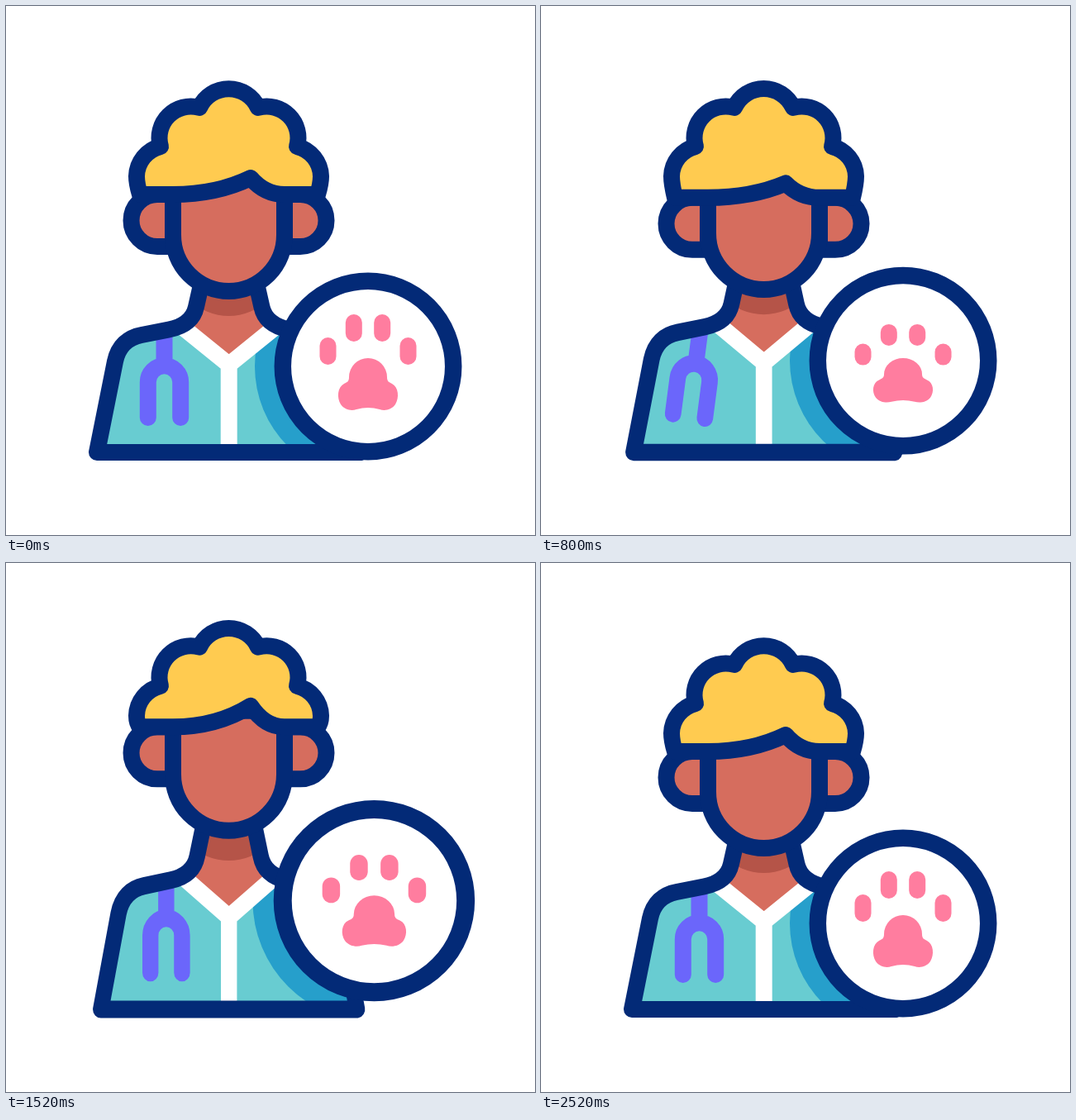
An HTML page with a canvas that plays this animation: 640x640 px, repeating every 2.88 s.

```html
<!DOCTYPE html>
<html lang="en">
<head>
<meta charset="utf-8">
<title>Vet</title>
<style>
html, body { margin: 0; width: 100%; height: 100%; overflow: hidden; background: #fff; }
canvas { display: block; width: 100vw; height: 100vh; }
</style>
</head>
<body>
<canvas width="640" height="640"></canvas>
<script>
const LOOP = 2880, STEP = 20;
const NAVY = '#032a77', HAIR = '#ffcb50', SKIN = '#d66d5e', SHADE = '#b55448',
      TEAL = '#68ccd1', BLUE = '#269fcb', VIOLET = '#6b66fb', PINK = '#ff7d9f';
const ctx = document.querySelector('canvas').getContext('2d');
ctx.lineJoin = ctx.lineCap = 'round';

// Returns a smooth curve through [ms, value] points that never overshoots them.
function curve(...points) {
  const last = points.length - 1;
  const rise = i => (points[i + 1][1] - points[i][1]) / (points[i + 1][0] - points[i][0]);
  const slope = i => {
    if (i < 1 || i >= last) return 0;
    const a = rise(i - 1), b = rise(i);
    return a * b > 0 ? 2 * a * b / (a + b) : 0;
  };
  return t => {
    if (t <= points[0][0]) return points[0][1];
    if (t >= points[last][0]) return points[last][1];
    const i = points.findIndex(p => p[0] > t) - 1;
    const [t0, v0] = points[i], [t1, v1] = points[i + 1];
    const h = t1 - t0, u = (t - t0) / h, w = 1 - u;
    return w * w * (1 + 2 * u) * v0 + u * u * (3 - 2 * u) * v1
      + h * u * w * (w * slope(i) - u * slope(i + 1));
  };
}

// The hop drives the whole figure: 1 is a full crouch, negative is a stretch.
const hop = curve([200, 0], [450, 1], [600, .376], [1020, -.52], [1330, -.71], [1465, -.6],
  [1705, .92], [1860, -.12], [1990, -.36], [2400, 0]);
const nod = curve([200, 0], [600, 8], [1020, 3], [1520, -14], [1860, 8], [2140, -13], [2440, 0]);
const swing = curve([200, 0], [600, 7], [1020, 8], [1520, 0], [1860, 5.5], [2140, -10.5], [2440, 0]);
const press = curve([200, 0], [500, 1], [1020, 1], [1520, .6], [1860, 1], [2140, 0]);

// Head and badge follow the body a little late; stretches reach further than crouches.
function poseAt(t) {
  const reach = (v, gain) => v < 0 ? v * gain : v;
  const body = hop(t), late = hop(t - 60);
  const size = 1 - .12 * late;
  return {
    wide: 1 + .085 * body,
    tall: 1 - .085 * reach(body, 1.75),
    head: 35 * late,
    nod: nod(t),
    swing: swing(t),
    press: press(t),
    size,
    x: 336 + 102 * size,
    y: 436 + 35 * reach(hop(t - 15), 1.75)
  };
}

function fill(path, color) {
  ctx.fillStyle = color;
  ctx.fill(path);
}
function line(path, color = NAVY, width = 20) {
  ctx.strokeStyle = color;
  ctx.lineWidth = width;
  ctx.stroke(path);
}
function outlined(d, color) {
  const path = new Path2D(d);
  fill(path, color);
  line(path);
}
function disc(x, y, r) {
  const path = new Path2D();
  path.arc(x, y, r, 0, 7);
  return path;
}
function group(draw) {
  ctx.save();
  draw();
  ctx.restore();
}
function scaleAt(x, y, sx, sy) {
  ctx.translate(x, y);
  ctx.scale(sx, sy);
  ctx.translate(-x, -y);
}

const torso = new Path2D('M110 540L132 430C136 411 148 401 164 398L197 391.5C217 387.5 227 378 230 364L244 302'
  + 'H295.4L309.4 364C312.4 378 322.4 387.5 342.4 391.5L375.4 398C391.4 401 403.4 411 407.4 430L429.4 540Z');
const neck = new Path2D('M212 387L269.7 434L327.4 387V300H212Z');
const collar = new Path2D('M212 387.3L269.7 434L327.4 387.3M269.7 434V540');
const tube = new Path2D('M191.5 380V435M171.8 498V455a19.7 19.7 0 0 1 39.4 0V498');
const pad = new Path2D('M-23 13A23 23 0 0 1 23 13C23 18 25 19 29 21C37 25 38 38 33 46C28 53 20 54 14 52'
  + 'Q0 48 -14 52C-20 54 -28 53 -33 46C-38 38 -37 25 -29 21C-25 19 -23 18 -23 13Z');

function drawBody(p) {
  group(() => {
    scaleAt(269.7, 540, p.wide, p.tall);
    group(() => {
      ctx.clip(torso);
      fill(torso, TEAL);
      group(() => {
        ctx.resetTransform();
        fill(disc(p.x, p.y, 137 * p.size), BLUE);
      });
      group(() => {
        ctx.translate(191.5, 396);
        ctx.rotate(p.swing * Math.PI / 180);
        ctx.translate(-191.5, -396);
        line(tube, VIOLET);
      });
      fill(neck, SKIN);
      group(() => {
        ctx.clip(neck);
        ctx.resetTransform();
        const drop = (p.head + 165 * (1 - p.tall)) / 2;
        fill(disc(269.5, 307 + drop, 68), SHADE);
      });
      ctx.lineCap = 'butt';
      ctx.lineJoin = 'miter';
      line(collar, '#fff');
    });
    line(torso);
  });
}

function drawHead(p) {
  const brow = 228 + .6 * p.nod, tip = 208 + p.nod;
  const chin = 277 - .3 * Math.max(0, p.nod);
  group(() => {
    ctx.translate(0, p.head);
    outlined(`M202 ${brow}H183a31.5 31.5 0 0 0 0 63H202Z`, SKIN);
    outlined(`M337 ${brow}H356a31.5 31.5 0 0 1 0 63H337Z`, SKIN);
    outlined(`M202 200V${chin}a67.5 68 0 0 0 135 0V200Z`, SKIN);
    outlined(`M162 ${brow}Q158 215 158 206A38 38 0 0 1 187 170A38 38 0 0 1 234 123A39 39 0 0 1 305 123`
      + `A38 38 0 0 1 352 170A38 38 0 0 1 381 206Q381 215 377 ${brow}H337`
      + `Q313 ${brow} 296 ${tip}Q255 ${brow} 202 ${brow}Z`, HAIR);
  });
}

function drawBadge(p) {
  const toe = (x, y) => {
    const h = 33 - 7 * p.press;
    const path = new Path2D();
    path.roundRect(x - 10, y - h / 2, 20, h, 10);
    fill(path, PINK);
  };
  group(() => {
    ctx.translate(p.x, p.y);
    ctx.scale(p.size, p.size);
    const ring = disc(0, 0, 103.2);
    fill(ring, '#fff');
    line(ring, NAVY, 20.5);
    for (const side of [-1, 1]) {
      toe(side * 17.2, -46.5 + 15.3 * p.press);
      toe(side * 48.5, -18.5 + 11 * p.press);
    }
    scaleAt(0, 36, 1, 1 - .15 * p.press);
    fill(pad, PINK);
  });
}

function draw(t) {
  const p = poseAt(t);
  ctx.fillStyle = '#fff';
  ctx.fillRect(0, 0, 640, 640);
  drawBody(p);
  drawHead(p);
  drawBadge(p);
}

const start = performance.now();
function tick() {
  const t = (performance.now() - start) % LOOP;
  draw(Math.floor(t / STEP) * STEP);
  requestAnimationFrame(tick);
}
tick();
</script>
</body>
</html>
```
